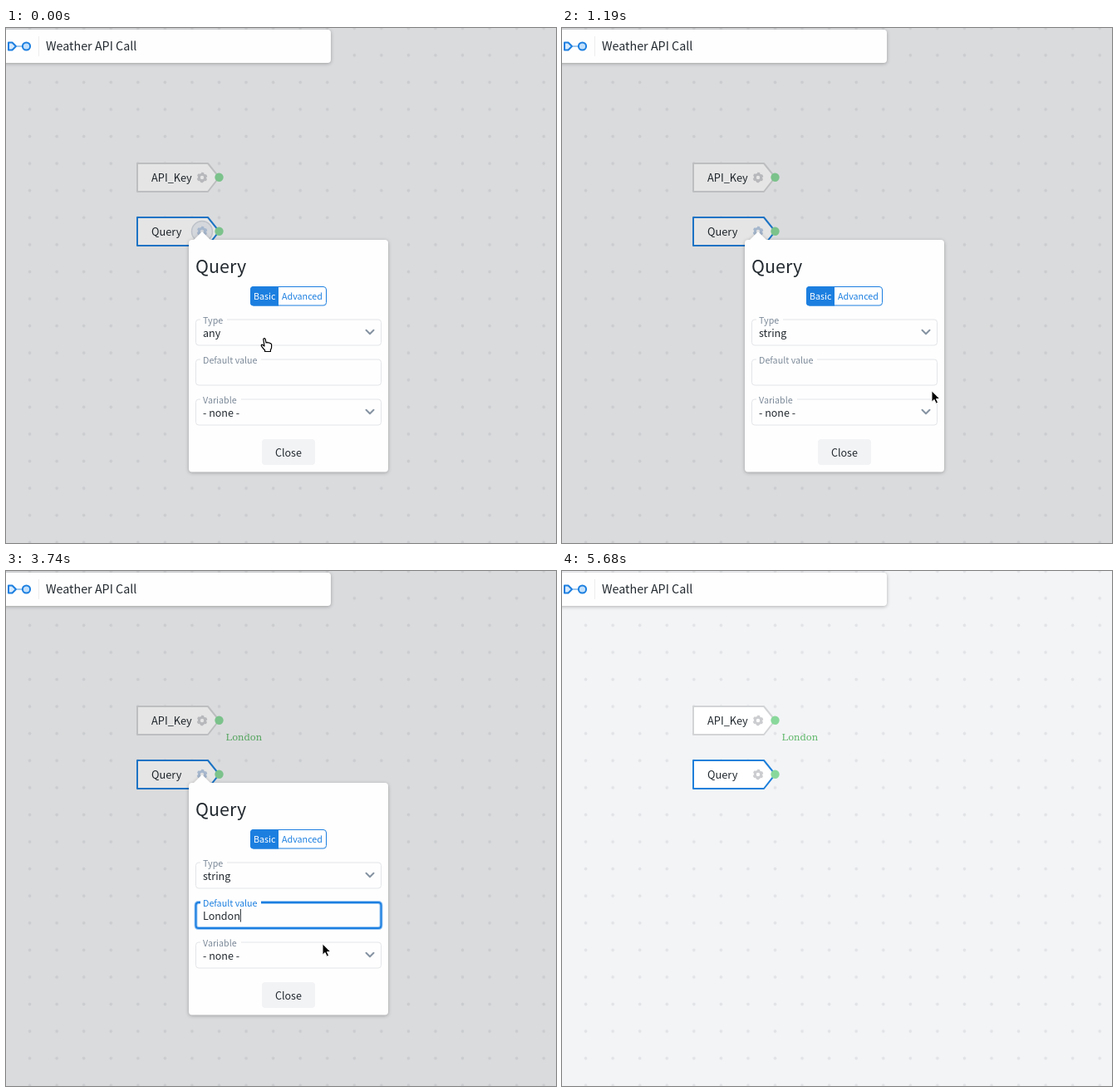
An HTML page that plays this animation: 662x620 px, repeating every 5.7 s.

```html
<!DOCTYPE html>
<html lang="en">
<head>
<meta charset="utf-8">
<title>Weather API Call</title>
<style>
  html, body { margin: 0; width: 100%; height: 100%; overflow: hidden; background: #f3f4f6; }
  svg { display: block; width: 662px; height: 620px; }
  text {
    font: 12.53px "Noto Sans CJK JP", "Noto Sans CJK SC", "Noto Sans CJK", "Source Sans Pro", "Noto Sans", sans-serif;
    fill: #22292f; white-space: pre;
  }
  .title { font-size: 14.32px; }
  .node text { font-size: 12.8px; }
  .heading { font-size: 21.5px; }
  .small, .label { font-size: 10.74px; }
  .label { fill: #7c8a99; }
  .blue { fill: #1c7fe0; }
  .caption { font: 11.5px "DejaVu Serif", "Noto Serif", serif; fill: #5cb667; }
  .node path { fill: #fff; stroke: #d2d4d6; stroke-width: 2; stroke-linejoin: round; }
  .node.active path { stroke: #1f80da; }
  .port { fill: #89d89b; }
  .gear { fill: none; stroke: #cccdd0; }
  .active .gear.lit { stroke: #b9cce4; }
  .box { fill: none; stroke: #e3e5e8; }
  .chevron { fill: none; stroke: #8593a2; stroke-width: 2; stroke-linecap: round; stroke-linejoin: round; }
  .card { fill: #fefefe; filter: drop-shadow(0 1px 2px rgba(0, 0, 0, .28)); }
  .dim { fill: #000; fill-opacity: .1; }
  .cursor { stroke-linejoin: round; stroke-linecap: round; }
</style>
</head>
<body>
<svg viewBox="0 0 662 620">
  <defs>
    <pattern id="dots" x="12.3" y="16.5" width="32.56" height="32.58" patternUnits="userSpaceOnUse">
      <circle cx="16.28" cy="16.29" r="1.9" fill="#e1e3e6"/>
    </pattern>
    <path id="tag" d="M158 163H243L256.5 179.8L243 197H158Z"/>
    <g id="cog">
      <circle r="3.7" stroke-width="3"/>
      <circle r="5.3" stroke-width="2" stroke-dasharray="3 2.55" transform="rotate(14)"/>
    </g>
    <path id="down" class="chevron" d="M-4.5 -2.2L0 2.3L4.5 -2.2"/>
  </defs>

  <rect width="662" height="620" fill="#f3f4f6"/>
  <rect width="662" height="620" fill="url(#dots)"/>

  <g class="node">
    <use href="#tag"/><path d="M158 163H243L256.5 179.8L243 197H158Z"/>
    <text x="175" y="185">API_Key</text>
    <use href="#cog" class="gear" x="236" y="180"/>
    <circle class="port" cx="256.5" cy="179.7" r="5.2"/>
  </g>
  <text class="caption" id="caption" x="264.5" y="204"></text>

  <g class="node active">
    <path d="M158 228H243L256.5 244.8L243 262H158Z"/>
    <text x="175" y="250">Query</text>
    <circle id="halo" cx="236" cy="245" r="12.5" fill="#eceff4" stroke="#d3d8e0" stroke-width="1.5"/>
    <use href="#cog" class="gear" id="gear" x="236" y="245"/>
    <circle class="port" cx="256.5" cy="244.7" r="5.2"/>
  </g>

  <g id="popup">
    <rect class="dim" width="662" height="620"/>
    <path class="card" d="M224 255H226L236 245L246 255H456Q460 255 460 259V530.5Q460 534.5 456 534.5H224Q220 534.5 220 530.5V259Q220 255 224 255Z"/>
    <text class="heading" x="228" y="295">Query</text>
    <rect x="294.5" y="311.5" width="91" height="22.5" rx="3.5" fill="#fff" stroke="#1c7fe0"/>
    <path d="M328 311V334.5H298Q294 334.5 294 330.5V315Q294 311 298 311Z" fill="#1c7fe0"/>
    <text class="small" x="298" y="326.7" style="fill:#fff">Basic</text>
    <text class="small blue" x="332" y="326.7">Advanced</text>
    <g id="fields"></g>
    <use href="#down" x="438" y="366"/>
    <use href="#down" x="438" y="462"/>
    <rect id="caret" y="407" width="1" height="15.5" fill="#22292f"/>
    <rect id="close" x="308" y="495" width="64" height="31" rx="4" fill="#f2f3f5" stroke-width="2"/>
    <text x="324" y="515.5">Close</text>
  </g>

  <g id="menu">
    <rect class="dim" width="662" height="620"/>
    <path class="card" d="M425 377H428L438 367.5L448 377H579Q582 377 582 380V581.5Q582 584.5 579 584.5H425Q422 584.5 422 581.5V380Q422 377 425 377Z"/>
    <rect id="hover" x="422" width="160" height="32" fill="#f2f3f5"/>
    <g id="options"></g>
  </g>

  <g>
    <rect class="card" x="-10" y="2" width="401" height="40" rx="4"/>
    <path d="M39.5 10V34" stroke="#ececee"/>
    <path d="M13 22H19.5" stroke="#7db5e8" stroke-width="1.5"/>
    <path d="M3 17.5H7.5L12 22L7.5 26.5H3Z" fill="#d6eafd" stroke="#1c7fe0" stroke-width="2" stroke-linejoin="round"/>
    <circle cx="24.5" cy="22" r="4.6" fill="#c2e0fb" stroke="#1c7fe0" stroke-width="2"/>
    <text class="title" x="48" y="27.4">Weather API Call</text>
  </g>

  <g id="pointer">
    <path class="cursor" id="arrow" d="M0 0V13.2L3.1 10.4L5.2 15.2L7.6 14.1L5.5 9.5H9.6Z" fill="#000" stroke="#fff"/>
    <path class="cursor" id="hand" fill="#fff" stroke="#000" stroke-width="1.2"
      d="M-1.2 0.6Q0 -1.6 1.2 0.6L2 5Q3.3 3.6 4.4 5.1Q5.8 4.1 6.7 5.8Q8.3 5.3 8.6 7.2V10.5Q8.3 12.5 7.4 13.5V15.5H0.6V14Q-1.8 11.5 -3.6 8.9Q-4.2 7.2 -2.4 7.2L0 9Z"/>
    <g id="beam" fill="none">
      <path d="M-3 -7.5Q0 -7.5 0 -5.5Q0 -7.5 3 -7.5M0 -5.5V5.5M-3 7.5Q0 7.5 0 5.5Q0 7.5 3 7.5M-2 2.5H2" stroke="#fff" stroke-width="2.6"/>
      <path d="M-3 -7.5Q0 -7.5 0 -5.5Q0 -7.5 3 -7.5M0 -5.5V5.5M-3 7.5Q0 7.5 0 5.5Q0 7.5 3 7.5M-2 2.5H2" stroke="#000" stroke-width="1.2"/>
    </g>
    <g id="cross">
      <path d="M-6.5 .5H7.5M.5 -6.5V7.5" stroke="#fff" stroke-opacity=".7" stroke-width="2.6"/>
      <path d="M-6 .5H7M.5 -6V7" stroke="#000"/>
    </g>
  </g>
</svg>

<script>
  const $ = id => document.getElementById(id);
  const show = (id, on) => { $(id).style.display = on ? '' : 'none'; };
  const clamp = (v, lo, hi) => Math.min(hi, Math.max(lo, v));

  const LOOP = 5700, TICK = 150, WORD = 'London';
  const OPTIONS = ['any', 'string', 'number', 'boolean', 'object', 'array'];

  // label, top edge, x where the border resumes after the label
  const FIELDS = [['Type', 351, 266], ['Default value', 399, 307], ['Variable', 447, 283]];
  const border = (y, gap) =>
    `M${gap} ${y}H448Q451.5 ${y} 451.5 ${y + 3.5}V${y + 27.5}Q451.5 ${y + 31} 448 ${y + 31}` +
    `H232Q228.5 ${y + 31} 228.5 ${y + 27.5}V${y + 3.5}Q228.5 ${y} 232 ${y}H234`;

  $('fields').innerHTML = FIELDS.map(([label, y, gap], i) => `
    ${i === 1 ? `<path id="glow" d="${border(y, gap)}" fill="none" stroke="#9cc8f5" stroke-width="4"/>` : ''}
    <path class="box" id="box${i}" d="${border(y + .5 - .5, gap)}"/>
    <text class="label" id="label${i}" x="237" y="${y + 4.7}">${label}</text>
    <text id="value${i}" x="237" y="${y + 21}"></text>`).join('');

  $('options').innerHTML = OPTIONS.map((name, i) =>
    `<text x="430" y="${405.7 + 32 * i}"${i ? '' : ' class="blue"'}>${name}</text>`).join('');

  // tick, x, y
  const PATH = [[2, 311, 374], [7, 445, 437], [9, 445, 437], [12, 399, 415], [23, 399, 415],
    [28, 348, 513], [30, 348, 513], [32, 379, 456], [33, 379, 456], [37, 651, 613]];

  function pointerAt(n) {
    const i = PATH.findIndex(p => p[0] >= n);
    if (i <= 0) return (i ? PATH[PATH.length - 1] : PATH[0]).slice(1);
    const [a, b] = [PATH[i - 1], PATH[i]];
    const u = (n - a[0]) / (b[0] - a[0]), e = u * u * (3 - 2 * u);
    return [1, 2].map(k => a[k] + (b[k] - a[k]) * e);
  }

  function pointerKind(n, y) {
    if (n === 0) return 'hand';
    if (n < 10) return 'arrow';
    if (n >= 29) return 'cross';
    if (y < 431) return 'beam';
    return y > 495 ? 'hand' : 'arrow';
  }

  function draw(n) {
    const open = n < 30, focus = n >= 12 && n < 29, menu = n >= 1 && n < 8;
    const [x, y] = pointerAt(n);

    show('popup', open);
    show('halo', n === 0);
    $('gear').classList.toggle('lit', open);

    $('value0').textContent = n < 8 ? 'any' : 'string';
    $('value1').textContent = WORD.slice(0, clamp(n - 15, 0, 6));
    $('value2').textContent = '- none -';
    $('caption').textContent = WORD.slice(0, clamp(n - 16, 0, 6));

    show('glow', focus);
    show('caret', focus);
    $('box1').style.cssText = focus ? 'stroke:#1c7fe0;stroke-width:2' : '';
    $('label1').style.fill = focus ? '#1c7fe0' : '';
    if (focus) $('caret').setAttribute('x', 237 + $('value1').getComputedTextLength());
    $('close').setAttribute('stroke', n === 29 ? '#86b8f1' : 'none');

    show('menu', menu);
    const row = Math.floor((y - 385) / 32);
    show('hover', x >= 422 && row >= 0);
    $('hover').setAttribute('y', 385 + 32 * row);

    const kind = pointerKind(n, y);
    for (const id of ['arrow', 'hand', 'beam', 'cross']) show(id, id === kind);
    show('pointer', n < 38);
    $('pointer').setAttribute('transform', `translate(${Math.round(x)} ${Math.round(y)})`);
  }

  const start = performance.now();
  let last = -1;
  function run() {
    const t = Math.max(0, performance.now() - start) % LOOP;
    const n = t >= 5680 ? 38 : Math.floor((t + (t > 800 ? 10 : 0)) / TICK);
    if (n !== last) draw(last = n);
    requestAnimationFrame(run);
  }
  run();
</script>
</body>
</html>
```
